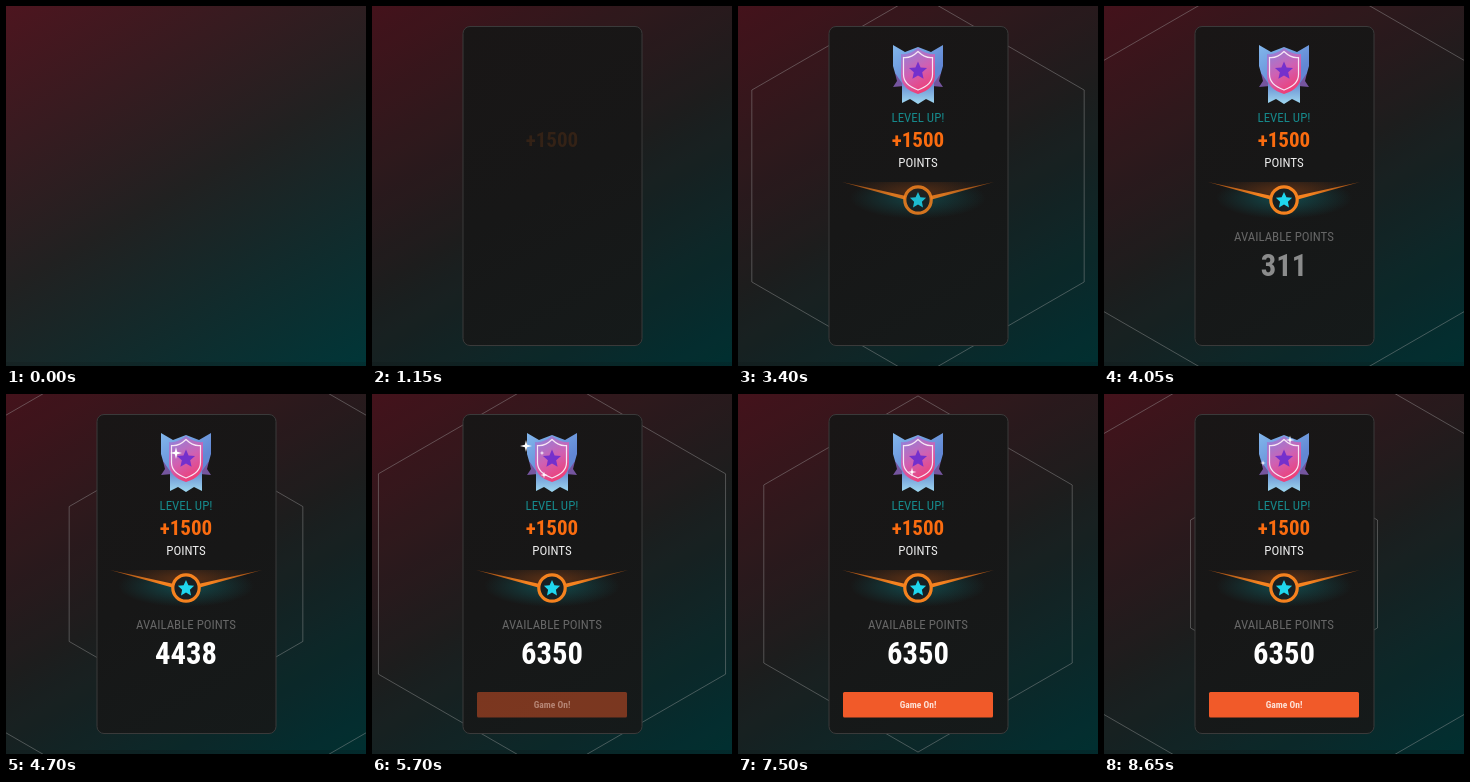
Recreate the animation shown at these times as an HTML page with a canvas. Size 360 by 360 pixels, loop 8700 ms.

```html
<!DOCTYPE html>
<html lang="en">
<head>
<meta charset="utf-8">
<title>Level up card</title>
<style>
  html, body { margin: 0; width: 100%; height: 100%; overflow: hidden; background: #212121; }
  canvas { display: block; width: 360px; height: 360px; }
</style>
</head>
<body>
<canvas id="stage"></canvas>
<script>
const LOOP = 8700, STEP = 50, SIZE = 360, MID = 180;
const canvas = document.getElementById('stage');
const ctx = canvas.getContext('2d');
const ratio = window.devicePixelRatio || 1;
canvas.width = canvas.height = SIZE * ratio;

const ramp = (t, from, to) => Math.min(1, Math.max(0, (t - from) / (to - from)));

function gradient(x0, y0, x1, y1, ...colors) {
  const g = ctx.createLinearGradient(x0, y0, x1, y1);
  colors.forEach((c, i) => g.addColorStop(i / (colors.length - 1), c));
  return g;
}

function poly(points, fill) {
  ctx.beginPath();
  points.forEach(([x, y]) => ctx.lineTo(x, y));
  ctx.closePath();
  if (fill) {
    ctx.fillStyle = fill;
    ctx.fill();
  }
}

function bothSides(points, fill) {
  poly(points, fill);
  poly(points.map(([x, y]) => [2 * MID - x, y]), fill);
}

// Soft elliptical light, visible only inside the polygon.
function glow(points, y, rx, ry, rgb, alpha) {
  ctx.save();
  poly(points);
  ctx.clip();
  ctx.translate(MID, y);
  ctx.scale(1, ry / rx);
  const g = ctx.createRadialGradient(0, 0, 0, 0, 0, rx);
  g.addColorStop(0, `rgba(${rgb},${alpha})`);
  g.addColorStop(1, `rgba(${rgb},0)`);
  ctx.fillStyle = g;
  ctx.fillRect(-rx, -rx, 2 * rx, 2 * rx);
  ctx.restore();
}

function star(x, y, tips, outer, inner, fill) {
  const points = Array.from({ length: tips * 2 }, (_, i) => {
    const r = i % 2 ? inner : outer, a = i * Math.PI / tips - Math.PI / 2;
    return [x + r * Math.cos(a), y + r * Math.sin(a)];
  });
  poly(points, fill);
}

function box(x, y, w, h, r) {
  ctx.beginPath();
  ctx.roundRect(x, y, w, h, r);
}

// Draws inside a faded layer; skipped while invisible.
function layer(alpha, draw) {
  if (alpha <= 0) return;
  ctx.save();
  ctx.globalAlpha = alpha;
  draw();
  ctx.restore();
}

// Uses the condensed face; a wider fallback face is set in a smaller size.
function label(text, y, size, weight, color, room, sample = text) {
  const font = px => `${weight} condensed ${px}px "Roboto Condensed", Roboto, sans-serif`;
  ctx.font = font(size);
  const width = ctx.measureText(sample).width;
  if (width > room) ctx.font = font(size * room / width);
  ctx.textAlign = 'center';
  ctx.fillStyle = color;
  ctx.fillText(text, MID, y);
}

function drawBackground(t) {
  ctx.fillStyle = gradient(57, -33, 303, 393, '#4d151f', '#212121', '#003638');
  ctx.fillRect(0, 0, SIZE, SIZE);
  ctx.fillStyle = 'rgba(18,18,18,.15)';
  ctx.fillRect(0, 356, SIZE, 4);
  layer(ramp(t, 200, 1000) * 0.12, () => {
    ctx.fillStyle = '#000';
    ctx.fillRect(0, 0, SIZE, SIZE);
  });
}

function drawHexagons(t) {
  for (let born = 820; born < t; born += 2160) {
    const age = t - born - 1530;
    const half = 105 + 0.0632 * age - 4.7e-6 * age * age;
    if (half < 1) continue;
    const r = half / Math.cos(Math.PI / 6);
    const points = Array.from({ length: 6 }, (_, i) => {
      const a = i * Math.PI / 3 - Math.PI / 2;
      return [MID + r * Math.cos(a), MID + r * Math.sin(a)];
    });
    poly(points);
    ctx.strokeStyle = 'rgba(165,165,165,.4)';
    ctx.lineWidth = 1;
    ctx.stroke();
  }
}

function drawCard() {
  box(91, 20.5, 179, 319, 7);
  ctx.fillStyle = gradient(91, 20, 270, 339, '#191616', '#171717', '#151a1a');
  ctx.fill();
  ctx.strokeStyle = '#3a3a3a';
  ctx.lineWidth = 1;
  ctx.stroke();
}

function shield(half, top, bottom) {
  const shoulder = top + 7, waist = top + (bottom - top) * 0.6;
  ctx.beginPath();
  ctx.moveTo(MID, top);
  ctx.quadraticCurveTo(MID + half * 0.5, shoulder, MID + half, shoulder - 1);
  ctx.lineTo(MID + half, waist);
  ctx.quadraticCurveTo(MID + half, bottom - 5, MID, bottom);
  ctx.quadraticCurveTo(MID - half, bottom - 5, MID - half, waist);
  ctx.lineTo(MID - half, shoulder - 1);
  ctx.quadraticCurveTo(MID - half * 0.5, shoulder, MID, top);
  ctx.closePath();
}

function drawBadge() {
  bothSides([[157, 67], [166, 66], [166, 80], [155, 81], [159, 75]], '#75559f');
  bothSides([[164, 66], [180, 66], [180, 98], [172, 93], [164, 97]],
    gradient(0, 72, 0, 98, '#5776c8', '#9fd8f0'));
  bothSides([[155, 39], [167, 46], [180, 41], [180, 77], [164, 77], [157, 67], [155, 60]],
    gradient(155, 39, 180, 75, '#82b7ec', '#6287d4'));
  shield(17, 42, 88);
  ctx.fillStyle = gradient(167, 42, 192, 87, '#8d84dc', '#d060b2', '#f5386a');
  ctx.fill();
  shield(14.5, 45.5, 84);
  ctx.strokeStyle = '#f7e6f5';
  ctx.lineWidth = 1.2;
  ctx.stroke();
  star(180, 65, 5, 9.5, 4.4, '#7430cc');
}

function drawDivider() {
  glow([[104, 176], [256, 176], [180, 196]], 186, 76, 18, '190,85,20', 0.42);
  glow([[104, 176], [180, 195], [256, 176], [256, 216], [104, 216]], 192, 68, 21, '15,125,130', 0.5);
  bothSides([[104, 176], [168, 190], [168, 194]],
    gradient(104, 0, 256, 0, '#8c4413', '#f5821f', '#f5821f', '#8c4413'));
  ctx.beginPath();
  ctx.arc(MID, 194, 13.2, 0, Math.PI * 2);
  ctx.fillStyle = '#182023';
  ctx.fill();
  ctx.strokeStyle = '#f5821f';
  ctx.lineWidth = 3.2;
  ctx.stroke();
  star(MID, 194.5, 5, 8.5, 4.1, '#1fd6ee');
}

function drawButton() {
  box(105, 298, 150, 25.5, 1.5);
  ctx.fillStyle = '#f15a29';
  ctx.fill();
  label('Game On!', 314, 9.5, 700, '#fde3d9', 38);
}

// x, y, radius, moment of full size
const sparkles = [
  [170, 59, 6, 4700], [193, 57, 4, 5200], [154, 52, 6, 5700], [172, 81, 4, 5650],
  [170, 59, 3.5, 5800], [186, 46, 4, 6300], [159, 69, 4, 6700], [170, 59, 5, 7050],
  [174, 78, 4.5, 7500], [154, 52, 5, 8050], [186, 46, 4.5, 8650], [159, 69, 3.5, 8600]
];

function drawSparkles(t) {
  for (const [x, y, r, peak] of sparkles) {
    const size = r * Math.max(0, 1 - Math.abs(t - peak) / 350);
    if (size > 0.3) star(x, y, 4, size, size * 0.27, '#fff');
  }
}

function render(t) {
  ctx.setTransform(ratio, 0, 0, ratio, 0, 0);
  drawBackground(t);
  drawHexagons(t);
  layer(ramp(t, 200, 1000), drawCard);
  layer(ramp(t, 1100, 1500), () => label('+1500', 141, 21, 700, '#fa6c10', 53));
  layer(ramp(t, 1450, 1900), () => label('POINTS', 161, 13, 400, '#ececec', 40));

  const drop = ramp(t, 2050, 2730);
  layer(drop ** 1.7, () => {
    const scale = 1.5 - 0.5 * drop;
    ctx.translate(MID, 68);
    ctx.scale(scale, scale);
    ctx.translate(-MID, -68);
    drawBadge();
  });

  layer(ramp(t, 2700, 3100), () => label('LEVEL UP!', 116, 13, 400, '#16888a', 53));
  layer(ramp(t, 3000, 3470), drawDivider);
  layer(ramp(t, 3500, 3950), () => label('AVAILABLE POINTS', 235, 13, 400, '#666', 100));
  layer(ramp(t, 3900, 4200), () => {
    const count = Math.floor(6350 * ramp(t, 4001, 5001));
    label(String(count), 269.5, 31, 700, '#fff', 62, '6350');
  });
  layer(ramp(t, 5420, 6030), drawButton);
  drawSparkles(t);
}

const start = performance.now();
function tick(now) {
  const t = Math.max(0, now - start) % LOOP;
  render(t < 200 ? 0 : Math.floor(t / STEP) * STEP);
  requestAnimationFrame(tick);
}
render(0);
requestAnimationFrame(tick);
</script>
</body>
</html>
```
